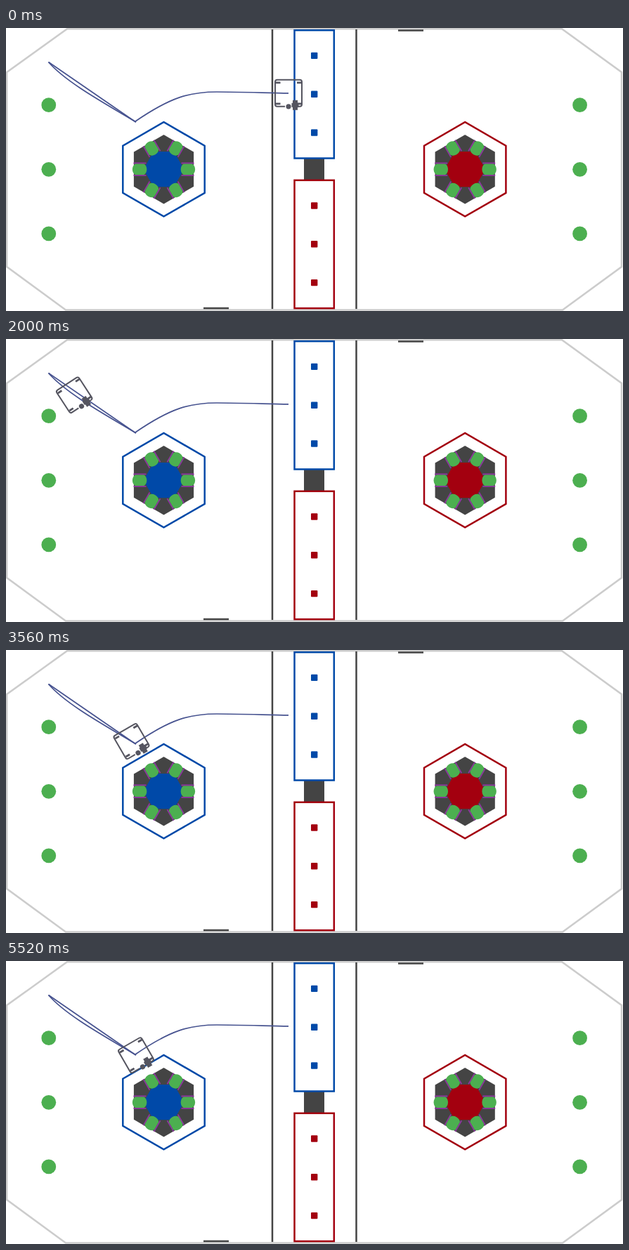
Animation, 878 px wide and 403 px high, one loop 5560 ms. Source, as an HTML page:

```html
<!DOCTYPE html>
<html lang="en">
<head>
<meta charset="utf-8">
<title>Robot path</title>
<style>
  html, body { margin: 0; width: 100%; height: 100%; overflow: hidden; background: #fff; }
  svg { display: block; width: 878px; height: 403px; }
</style>
</head>
<body>
<svg id="stage" viewBox="0 0 878 403" fill="none">
  <path d="M87 1.2H791L876 63V340L792 401.6H85L1.2 340V63Z" stroke="#ccc" stroke-width="2.5"/>
  <path d="M379 2V400M498.5 2V400M558 3.5H594M281 399H317" stroke="#444" stroke-width="2.5"/>
  <rect x="424" y="186" width="29" height="31" fill="#444"/>
  <g id="field"></g>
  <g id="routes" stroke="#46528f" stroke-width="1.7" stroke-linejoin="round"></g>
  <g id="robot" stroke="#555560" stroke-width="2">
    <path d="M-5 19H-16A3 3 0 0 1 -19 16V-16A3 3 0 0 1 -16 -19H16A3 3 0 0 1 19 -16V16A3 3 0 0 1 16 19H6"/>
    <path d="M-18 -15H-11.5M12 -15H18.5M-18 15H-11.5M12 15H18.5" stroke-width="2.8"/>
    <g fill="#555560" stroke="none">
      <circle cy="19" r="3.6"/>
      <rect x="6" y="10" width="7" height="14"/>
      <rect x="4.5" y="14" width="10" height="6"/>
    </g>
  </g>
</svg>
<script>
const BLUE = '#0049a8', RED = '#a3000f', GREEN = '#4caf50';
const LOOP = 5560, STEP = 40;
const field = document.getElementById('field');
const routes = document.getElementById('routes');
const robot = document.getElementById('robot');

function add(parent, tag, attrs) {
  const el = document.createElementNS('http://www.w3.org/2000/svg', tag);
  for (const name in attrs) el.setAttribute(name, attrs[name]);
  return parent.appendChild(el);
}

function hexagon(parent, radius, startDeg, attrs) {
  const points = Array.from({ length: 6 }, (_, i) => {
    const a = (startDeg + i * 60) * Math.PI / 180;
    return `${(radius * Math.cos(a)).toFixed(2)},${(radius * Math.sin(a)).toFixed(2)}`;
  }).join(' ');
  add(parent, 'polygon', { points, ...attrs });
}

function station(y, color) {
  add(field, 'rect', { x: 410.5, y, width: 56.3, height: 182.3, stroke: color, 'stroke-width': 2.5 });
  for (let i = 0; i < 3; i++) {
    add(field, 'rect', { x: 434, y: y + 31.5 + i * 54.8, width: 9.4, height: 9.4, rx: 1, fill: color });
  }
}

function tower(x, color) {
  const g = add(field, 'g', { transform: `translate(${x} 201.2)` });
  hexagon(g, 67.2, 30, { stroke: color, 'stroke-width': 2.5 });
  hexagon(g, 49.2, 30, { fill: '#444' });
  hexagon(g, 29, 0, { fill: color });
  for (let deg = 0; deg < 360; deg += 60) {
    const arm = add(g, 'g', { transform: `rotate(${deg})` });
    add(arm, 'path', { d: 'M25 -8.7H43M25 8.7H43', stroke: '#8e35a0', 'stroke-width': 1.8 });
    add(arm, 'path', { d: 'M28 -7.8H40.5Q44.6 -5 44.6 0T40.5 7.8H28Q24.2 5 24.2 0T28 -7.8Z', fill: GREEN });
  }
}

station(3.2, BLUE);
station(216.8, RED);
tower(224.5, BLUE);
tower(653.2, RED);
for (const x of [60.8, 816.6]) {
  for (let i = 0; i < 3; i++) add(field, 'circle', { cx: x, cy: 109.7 + i * 91.6, r: 10.4, fill: GREEN });
}

const [approach, outbound, inbound] = [
  'M402 92.8C370 92.3 330 91 300 91C262 91 235 98 184 133',
  'M184 133.3C140 107 85 77 60.5 48.5',
  'M60.5 48.5L185 134.2'
].map(d => {
  const path = add(routes, 'path', { d });
  return { path, length: path.getTotalLength() };
});

// Each leg: route, end time, ramp share of the leg, start and end heading, turn exponent.
const legs = [
  [approach, 1358, 0.258, 0, -30, 0.8],
  [outbound, 2400, 0.35, -30, -34.5, 1],
  [inbound, 3416, 0.35, -34.5, -30, 1],
  [outbound, 4450, 0.35, -30, -34.5, 1],
  [inbound, 5520, 0.35, -34.5, -30, 1]
];

// Distance share under a symmetric trapezoidal speed profile.
function trapezoid(u, ramp) {
  if (u > 0.5) return 1 - trapezoid(1 - u, ramp);
  const speed = 1 / (1 - ramp);
  return u < ramp ? speed * u * u / (2 * ramp) : speed * (u - ramp / 2);
}

function render(time) {
  let index = legs.findIndex(leg => time < leg[1]);
  if (index < 0) index = legs.length - 1;
  const [route, end, ramp, from, to, turn] = legs[index];
  const start = index ? legs[index - 1][1] : 0;
  const s = trapezoid(Math.min(1, (time - start) / (end - start)), ramp);
  const p = route.path.getPointAtLength(s * route.length);
  const heading = from + (to - from) * Math.pow(s, turn);
  robot.setAttribute('transform', `translate(${p.x} ${p.y}) rotate(${heading})`);
}

const origin = performance.now();
function tick() {
  const time = (performance.now() - origin) % LOOP;
  render(Math.floor(time / STEP) * STEP);
  requestAnimationFrame(tick);
}
tick();
</script>
</body>
</html>
```
